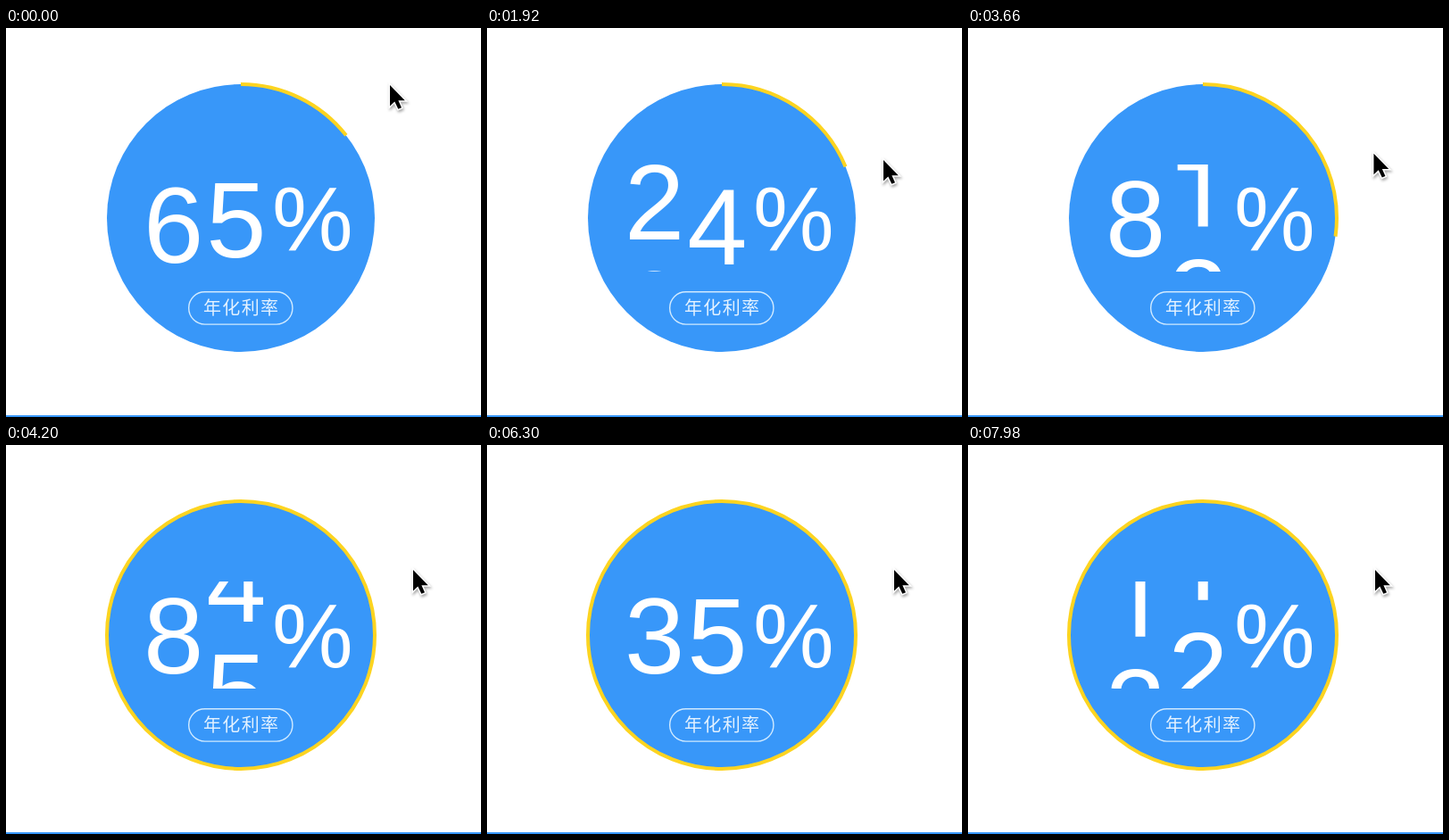
Recreate the animation shown at these times as an HTML page. Size 532x436 px, loop 8 s.

```html
<!DOCTYPE html>
<html lang="zh">
<head>
<meta charset="utf-8">
<title>年化利率</title>
<style>
  html, body { margin: 0; width: 100%; height: 100%; overflow: hidden; background: #fff; }
  svg { display: block; width: 532px; height: 436px; }
  .digits, .percent { fill: #fff; font-family: "Liberation Sans", Arial, sans-serif; }
  .digits { font-size: 121px; }
  .percent { font-size: 102px; }
  .label { fill: #e4f2ff; font: 300 20px "Noto Sans CJK SC", "Noto Sans CJK", sans-serif; letter-spacing: 1.4px; text-anchor: middle; }
  .pill { fill: none; stroke: #d0eaff; stroke-width: 1.4; }
  .ring { fill: none; stroke: #fdd420; stroke-width: 4; }
  .cursor { filter: drop-shadow(1px 2px 1.5px rgba(0, 0, 0, .35)); }
</style>
</head>
<body>
<svg viewBox="0 0 532 436">
  <defs>
    <clipPath id="window"><rect x="113" y="153" width="300" height="120"/></clipPath>
  </defs>
  <rect y="434" width="532" height="2" fill="#3897f9"/>
  <circle cx="263" cy="213" r="150" fill="#3897f9"/>
  <circle id="ring" class="ring" cx="263" cy="213" r="150" pathLength="100" transform="rotate(-90 263 213)"/>
  <g class="digits" clip-path="url(#window)">
    <g id="tens"></g>
    <g id="ones"></g>
  </g>
  <text class="percent" x="298" y="248.5">%</text>
  <rect class="pill" x="204.7" y="295.7" width="116.2" height="36.4" rx="18"/>
  <text class="label" x="263.7" y="321">年化利率</text>
  <g id="cursor" class="cursor">
    <path d="M0 0V23.5L5.3 18.5L9.3 26.8L13 25.2L9.4 17.2H16.8Z" stroke="#fff" stroke-width="3" paint-order="stroke"/>
  </g>
</svg>
<script>
  const LOOP = 8000, STEP = 60;
  const RING_TIME = 625, ROLL_TIME = 1130;
  const ROW = 120, BASELINE = 255.5;
  const COLUMNS = { tens: 154, ones: 224.2 };

  // Each run rolls both digits from one value to the next.
  const runs = [
    { start: -90, from: [6, 5], to: [2, 4] },
    { start: 1803, from: [2, 4], to: [8, 1] },
    { start: 3490, from: [8, 1], to: [8, 6] },
    { start: 5160, from: [8, 6], to: [3, 5] },
    { start: 7156, from: [3, 5], to: [1, 1] }
  ];

  // time, x, y
  const cursorPath = [
    [0, 430, 64], [860, 430, 64], [1680, 444, 148], [1920, 444, 148],
    [2580, 448, 143], [2760, 448, 143], [3420, 454, 141], [4200, 456, 140], [LOOP, 456, 140]
  ];

  const byId = id => document.getElementById(id);
  const clamp = x => Math.min(1, Math.max(0, x));
  const swing = x => (1 - Math.cos(Math.PI * x)) / 2;
  const mix = (a, b, p) => a + (b - a) * p;

  function addNode(parent, tag, attrs) {
    const node = document.createElementNS("http://www.w3.org/2000/svg", tag);
    for (const key in attrs) node.setAttribute(key, attrs[key]);
    return parent.appendChild(node);
  }

  function buildStrip(strip) {
    for (let d = 0; d < 10; d++) {
      // The one has no foot, so it is drawn instead of typed.
      if (d === 1) {
        addNode(strip, "path", {
          d: "M33.5 0V-63H10.5V-70.5C26 -71.5 33 -74 36 -84.5H44.5V0Z",
          transform: `translate(0 ${ROW})`
        });
      } else {
        addNode(strip, "text", { y: d * ROW }).textContent = d;
      }
    }
  }

  function setDigit(id, value) {
    byId(id).setAttribute("transform", `translate(${COLUMNS[id]} ${BASELINE - value * ROW})`);
  }

  function cursorAt(t) {
    const i = cursorPath.findIndex(point => point[0] > t);
    const [t0, x0, y0] = cursorPath[i - 1], [t1, x1, y1] = cursorPath[i];
    const p = swing((t - t0) / (t1 - t0));
    return [mix(x0, x1, p), mix(y0, y1, p)];
  }

  function draw(t) {
    const run = runs.filter(r => r.start <= t).pop();
    const elapsed = t - run.start;
    const roll = swing(clamp(elapsed / ROLL_TIME));
    const arc = clamp(elapsed / RING_TIME) * 100;
    ["tens", "ones"].forEach((id, i) => setDigit(id, mix(run.from[i], run.to[i], roll)));
    byId("ring").setAttribute("stroke-dasharray", arc < 100 ? `${arc} 200` : "none");
    byId("ring").setAttribute("visibility", arc > 0 ? "visible" : "hidden");
    byId("cursor").setAttribute("transform", `translate(${cursorAt(t).join(" ")})`);
  }

  function tick() {
    const t = performance.now() % LOOP;
    draw(Math.floor(t / STEP) * STEP);
    requestAnimationFrame(tick);
  }

  Object.keys(COLUMNS).forEach(id => buildStrip(byId(id)));
  tick();
</script>
</body>
</html>
```
